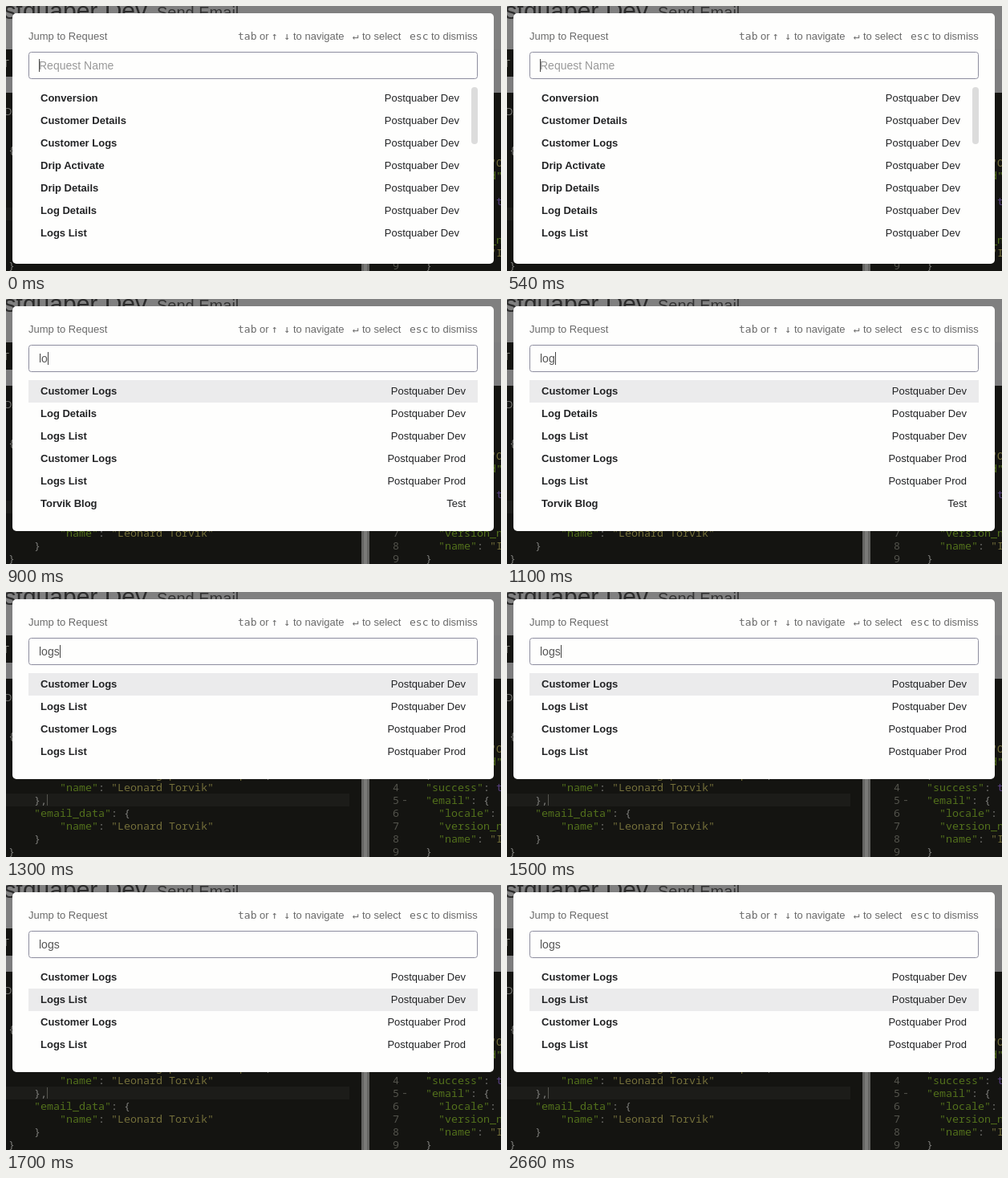
Write an HTML page that moves like this. It is 617 px wide and 330 px high and loops after 3.3 s.

```html
<!DOCTYPE html>
<html lang="en">
<head>
<meta charset="utf-8">
<title>Jump to Request</title>
<style>
  html, body { margin: 0; width: 100%; height: 100%; overflow: hidden; background: #141411; }
  svg { display: block; width: 617px; height: 330px; }
  text { font: 13px "Liberation Sans", Arial, sans-serif; white-space: pre; }
  .code { font: 13.333px "Noto Sans Mono", "DejaVu Sans Mono", monospace; }
  .key { font: 13px "DejaVu Sans Mono", monospace; }
  .name { font-weight: bold; }
  .field { font-size: 14px; }
  .big { font-size: 30px; }
  .mid { font-size: 20px; }
</style>
</head>
<body>
<svg id="stage" viewBox="0 0 617 330"></svg>
<script>
const NS = "http://www.w3.org/2000/svg";
const stage = document.getElementById("stage");

function add(parent, tag, attrs, content) {
  const el = document.createElementNS(NS, tag);
  for (const k in attrs) el.setAttribute(k, attrs[k]);
  if (content !== undefined) el.textContent = content;
  return parent.appendChild(el);
}
const rect = (parent, x, y, width, height, fill, extra) =>
  add(parent, "rect", { x, y, width, height, fill, ...extra });
const label = (parent, x, y, str, fill, cls = "", anchor = "start") =>
  add(parent, "text", { x, y, fill, class: cls, "text-anchor": anchor }, str);

// Dimmed editor
const COL = 8, LINE = 16;
const PLAIN = "#7c7c79", PROP = "#53711c", STR = "#736e3a", ATOM = "#574080", NUM = "#53534c";

function codeLine(x, y, src) {
  for (const m of src.matchAll(/"[^"]*"(?=:)|"[^"]*"|true|[{},:]+/g)) {
    const tok = m[0];
    const isProp = tok[0] === '"' && src[m.index + tok.length] === ":";
    const fill = isProp ? PROP : tok[0] === '"' ? STR : tok === "true" ? ATOM : PLAIN;
    label(stage, x + m.index * COL, y, tok, fill, "code");
  }
}

function drawBackdrop() {
  rect(stage, 0, 0, 617, 330, "#141411");
  rect(stage, 0, 0, 617, 54, "#808080");
  rect(stage, 0, 88, 617, 20, "#7d7d7e");
  rect(stage, 453, 54, 164, 54, "#7d7d7e");
  label(stage, 176, 16, "Postquaber Dev", "#2b2b2b", "big", "end");
  label(stage, 188, 15, "Send Email", "#333", "mid");
  label(stage, 4, 76, "T", "#85857f", "", "end");
  label(stage, -2, 136, "DATA", "#70706c");

  rect(stage, 0, 251, 428, 16, "#1c1c19");
  rect(stage, 51, 252, 1, 14, "#55554f");
  rect(stage, 443, 108, 10, 222, "#656563");
  rect(stage, 446, 108, 4, 222, "#7a7a78");

  const request = [
    "{", "", "",
    '        "address": "lorg@postal.example",',
    '        "name": "Leonard Torvik"',
    "    },",
    '    "email_data": {',
    '        "name": "Leonard Torvik"',
    "    }",
    "}"
  ];
  request.forEach((s, i) => codeLine(3, 184 + i * LINE, s));

  const response = [
    "{", '  "status": "OK",', '  "receipt_id":', "  ,",
    '  "success": true,', '  "email": {', '    "locale": "en",',
    '    "version_name": "One",', '    "name": "Invoice"', "  }"
  ];
  response.forEach((s, i) => {
    codeLine(507, 184 + i * LINE, s);
    if (i > 3) label(stage, 482, 184 + i * LINE, String(i), NUM, "code");
  });
  label(stage, 493, 263, "-", NUM, "code");
}

// Dialog
const GRAY = "#6a6a6a", INK = "#222325";
let box, field, caret, list;

function drawDialog() {
  box = rect(stage, 8, 9, 600, 312, "#fefefd", { rx: 5 });
  label(stage, 28, 42, "Jump to Request", GRAY);
  const hints = [
    [289, "tab", "key"], [316, "or"], [331, "↑", "key"], [346.5, "↓", "key"],
    [358, "to navigate"], [432, "↵", "key"], [444, "to select"],
    [503, "esc", "key"], [530, "to dismiss"]
  ];
  for (const [x, str, cls] of hints) label(stage, x, 42, str, GRAY, cls);
  rect(stage, 28.5, 57.5, 559, 33, "#fefefd", { rx: 3, stroke: "#8d8d9f" });
  field = label(stage, 41, 79, "", "#555", "field");
  caret = rect(stage, 41, 66, 1, 16, "#444");
  list = add(stage, "g", {});
}

const DEV = "Postquaber Dev", PROD = "Postquaber Prod";
const ALL = ["Conversion", "Customer Details", "Customer Logs", "Drip Activate",
  "Drip Details", "Log Details", "Logs List"].map(n => [n, DEV]);
const LOGS = [["Customer Logs", DEV], ["Logs List", DEV],
  ["Customer Logs", PROD], ["Logs List", PROD]];
const LO = [LOGS[0], ["Log Details", DEV], ...LOGS.slice(1), ["Torvik Blog", "Test"]];

const LOOP = 3300;
const steps = [
  { at: 0, text: "", rows: ALL, pick: -1, caret: 41 },
  { at: 900, text: "lo", rows: LO, pick: 0, caret: 52 },
  { at: 1100, text: "log", rows: LO, pick: 0, caret: 60 },
  { at: 1300, text: "logs", rows: LOGS, pick: 0, caret: 67 },
  { at: 1700, text: "logs", rows: LOGS, pick: 1 }
];

function show(step) {
  const scrolls = step.rows === ALL;
  box.setAttribute("height", scrolls ? 312 : 112 + step.rows.length * 28);
  field.textContent = step.text || "Request Name";
  field.setAttribute("fill", step.text ? "#555" : "#999");
  caret.setAttribute("visibility", step.caret ? "visible" : "hidden");
  if (step.caret) caret.setAttribute("x", step.caret);

  list.replaceChildren();
  step.rows.forEach(([name, space], i) => {
    const y = 101 + i * 28;
    if (i === step.pick) rect(list, 28, y, 560, 28, "#ebebec");
    label(list, 43, y + 18, name, INK, "name");
    label(list, scrolls ? 565 : 573, y + 18, space, INK, "", "end");
  });
  if (scrolls) rect(list, 580, 101, 8, 71, "#dcdcdc", { rx: 4 });
}

drawBackdrop();
drawDialog();

const start = performance.now();
let current;
function tick() {
  const t = (performance.now() - start) % LOOP;
  const step = steps.findLast(s => s.at <= t);
  if (step !== current) show(current = step);
  requestAnimationFrame(tick);
}
tick();
</script>
</body>
</html>
```
